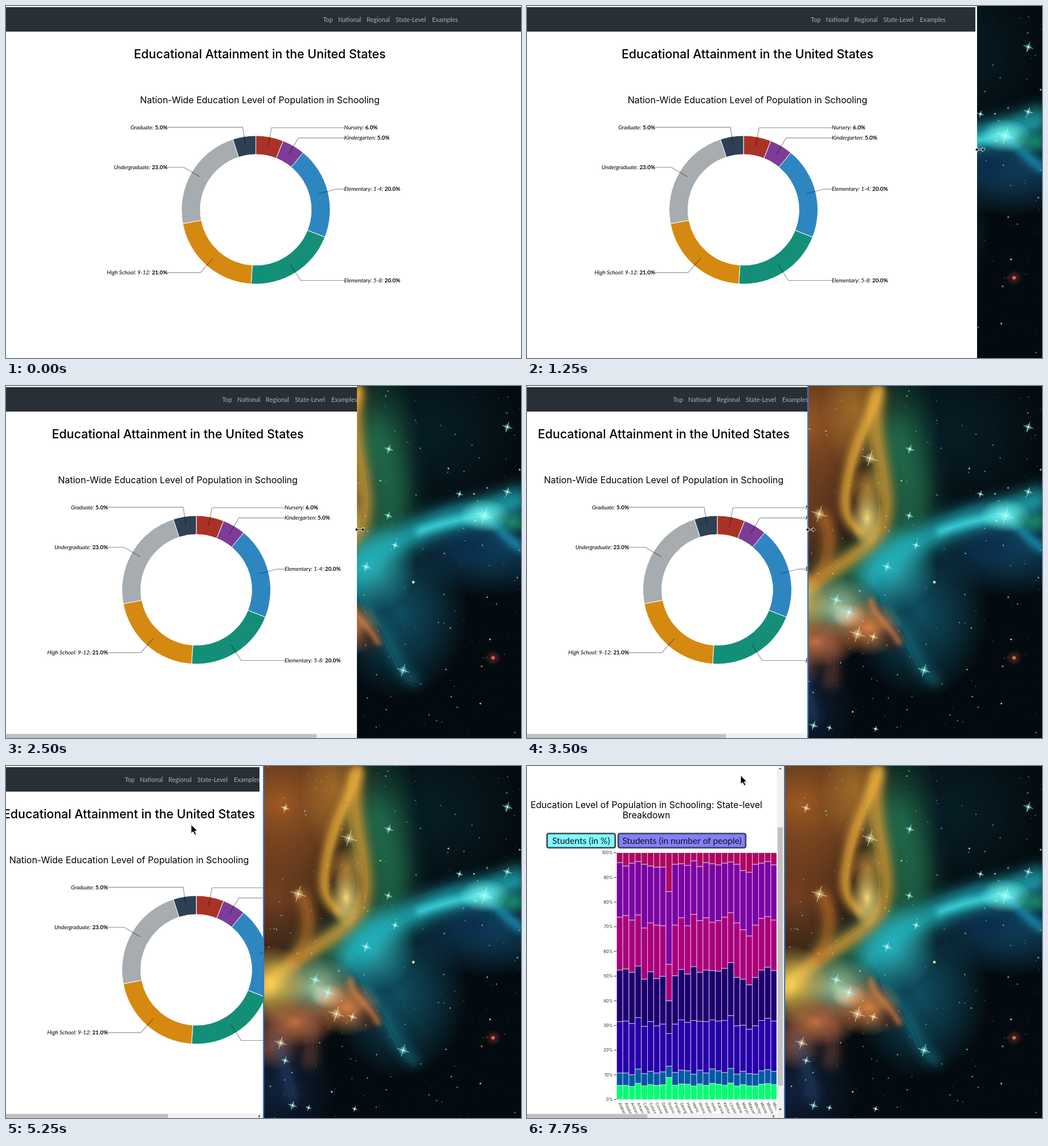
An HTML page with a canvas for the animation above (8 s loop, 904 px wide and 619 px high).

```html
<!DOCTYPE html>
<html lang="en">
<head>
<meta charset="utf-8">
<title>Educational Attainment</title>
<style>
  html, body { margin: 0; width: 100%; height: 100%; overflow: hidden; background: #fff; }
  canvas, #stage { position: absolute; left: 0; top: 0; display: block; }
  text { font-family: Lato, sans-serif; }
  .head { font-family: Inter, sans-serif; }
</style>
</head>
<body>
<canvas id="sky" width="904" height="619"></canvas>
<svg id="stage" width="904" height="619" viewBox="0 0 904 619"></svg>
<script>
const W = 904, H = 619, STEP = 250, LOOP = 8000;

// ---------- helpers ----------
function el(parent, tag, attrs = {}, text) {
  const node = document.createElementNS('http://www.w3.org/2000/svg', tag);
  for (const k in attrs) node.setAttribute(k, attrs[k]);
  if (text !== undefined) node.textContent = text;
  return parent.appendChild(node);
}
const set = (node, attrs) => { for (const k in attrs) node.setAttribute(k, attrs[k]); };
const show = (node, on) => node.setAttribute('display', on ? 'inline' : 'none');
const move = (node, x, y = 0) => node.setAttribute('transform', `translate(${x} ${y})`);
const group = parent => el(parent, 'g');
const rect = (parent, x, y, width, height, fill, more) =>
  el(parent, 'rect', { x, y, width, height, fill, ...more });
const label = (parent, x, y, size, text, more) =>
  el(parent, 'text', { x, y, 'font-size': size, ...more }, text);
const heading = (parent, x, y, size, text, more) =>
  label(parent, x, y, size, text, { class: 'head', 'text-anchor': 'middle', ...more });

function seeded(seed) {
  return () => (seed = (seed * 16807) % 2147483647) / 2147483647;
}

// ---------- night sky ----------
function paintSky(ctx) {
  const rnd = seeded(77);
  ctx.fillStyle = '#040b10';
  ctx.fillRect(0, 0, W, H);

  const blob = (x, y, rx, ry, color, alpha) => {
    const g = ctx.createRadialGradient(0, 0, 0, 0, 0, 1);
    g.addColorStop(0, color);
    g.addColorStop(0.5, color + '90');
    g.addColorStop(1, color + '00');
    ctx.save();
    ctx.globalAlpha = alpha;
    ctx.translate(x, y);
    ctx.scale(rx, ry);
    ctx.fillStyle = g;
    ctx.fillRect(-1, -1, 2, 2);
    ctx.restore();
  };
  const ribbon = (d, width, blur, color, alpha, strands = 0) => {
    const path = new Path2D(d);
    ctx.save();
    ctx.strokeStyle = color;
    ctx.globalAlpha = alpha;
    ctx.lineWidth = width;
    ctx.filter = `blur(${blur}px)`;
    ctx.stroke(path);
    ctx.filter = 'none';
    ctx.lineWidth = 0.8;
    ctx.globalAlpha = 0.16;
    for (let i = 0; i < strands; i++) {
      ctx.save();
      ctx.translate((rnd() - 0.5) * width, (rnd() - 0.5) * width);
      ctx.stroke(path);
      ctx.restore();
    }
    ctx.restore();
  };

  blob(740, 80, 170, 150, '#07222a', 0.8);
  blob(850, 280, 150, 90, '#11496a', 0.9);
  blob(690, 400, 120, 150, '#11596f', 0.85);
  blob(470, 570, 110, 110, '#14294a', 0.7);
  blob(480, 70, 190, 190, '#a05a24', 1);
  blob(470, 230, 140, 170, '#7c4420', 0.9);
  blob(575, 40, 60, 110, '#c08030', 0.7);
  blob(655, 110, 70, 180, '#1c5a3c', 0.8);
  ribbon('M640 60 C650 130 690 180 670 235 S600 310 520 360', 70, 22, '#23704f', 0.8, 14);
  blob(640, 320, 80, 80, '#2fb0b8', 0.9);
  ribbon('M616 5 C600 80 630 150 630 205 S610 275 560 308 S490 355 440 400', 24, 9, '#d99a36', 0.85, 16);
  ribbon('M618 0 C612 40 578 90 566 150 S552 230 590 262', 16, 7, '#f0b23c', 0.85, 14);
  ribbon('M515 220 C540 260 535 310 500 350', 20, 9, '#c8792c', 0.7, 8);
  blob(597, 232, 28, 55, '#ffe07a', 0.95);
  blob(598, 180, 30, 40, '#e0a040', 0.7);
  ribbon('M604 352 C625 300 680 275 735 250 S850 225 914 192', 40, 14, '#22b4c0', 0.85, 20);
  ribbon('M720 258 C770 238 800 236 840 226', 12, 6, '#4ff0f2', 0.7, 6);
  ribbon('M840 225 C860 245 880 270 908 288', 16, 7, '#1f9fc4', 0.75, 8);
  ribbon('M622 335 C618 380 650 410 672 450 S695 510 725 520', 18, 10, '#1b8496', 0.55, 12);
  blob(840, 228, 45, 30, '#7dfff4', 0.85);
  blob(890, 240, 40, 22, '#20a878', 0.7);
  blob(815, 282, 65, 35, '#0a2b4c', 0.8);
  blob(545, 390, 75, 55, '#a9d0a4', 0.95);
  blob(465, 385, 65, 70, '#ffd658', 0.95);
  blob(565, 405, 30, 22, '#f2f4df', 0.8);
  blob(600, 425, 60, 50, '#df8342', 0.95);
  blob(510, 450, 75, 45, '#e0824a', 0.9);
  blob(470, 490, 50, 45, '#b46650', 0.7);
  blob(640, 445, 28, 30, '#3a211c', 0.8);
  ribbon('M605 372 C600 400 640 420 655 455', 9, 5, '#e08848', 0.7, 8);
  ribbon('M520 440 C535 470 540 490 530 530', 26, 10, '#8a5040', 0.5, 10);
  ribbon('M475 480 C490 510 490 550 505 590', 18, 9, '#355080', 0.5, 8);

  for (let i = 0; i < 620; i++) {
    ctx.globalAlpha = 0.2 + rnd() * 0.65;
    ctx.fillStyle = ['#d8fff2', '#8fe6e0', '#ffe9c0', '#6fb8c8'][i % 4];
    ctx.beginPath();
    ctx.arc(440 + rnd() * 464, rnd() * H, 0.35 + rnd() ** 4 * 1.3, 0, 7);
    ctx.fill();
  }
  ctx.globalAlpha = 1;

  const disc = (x, y, r, color) => {
    ctx.fillStyle = color;
    ctx.beginPath();
    ctx.arc(x, y, r, 0, 7);
    ctx.fill();
  };
  blob(855, 478, 14, 14, '#a03c30', 0.5);
  disc(855, 478, 3, '#e2694e');
  disc(835, 493, 1.7, '#c8563f');
  disc(715, 345, 2.4, '#f0dfa0');

  const sparkle = (x, y, r, color) => {
    blob(x, y, r * 0.7, r * 0.7, color, 0.7);
    ctx.strokeStyle = color;
    ctx.lineWidth = 0.9;
    ctx.beginPath();
    for (const a of [0.3, 1.87]) {
      const dx = r * Math.cos(a), dy = r * Math.sin(a);
      ctx.moveTo(x - dx, y - dy);
      ctx.lineTo(x + dx, y + dy);
    }
    ctx.stroke();
    disc(x, y, 1.4, '#fff');
  };
  [[602, 127, 14], [513, 225, 14], [490, 74, 8], [482, 487, 11], [608, 441, 8], [580, 436, 14]]
    .forEach(s => sparkle(...s, '#ffedb0'));
  [[543, 376, 10], [565, 398, 11], [840, 228, 15], [880, 72, 9], [672, 111, 8], [880, 186, 8],
   [697, 500, 11], [503, 597, 8], [632, 318, 9], [612, 603, 5], [671, 228, 7], [490, 518, 7],
   [683, 280, 7], [796, 190, 6], [531, 601, 5]]
    .forEach(s => sparkle(...s, '#a8fff6'));
}

// ---------- page parts ----------
function buildNav(parent) {
  const bar = rect(parent, 0, 2, W, 43, '#282f37');
  const links = group(parent);
  [['Top', 556.5], ['National', 583], ['Regional', 633], ['State-Level', 684], ['Examples', 748]]
    .forEach(([name, x]) => label(links, x - 793, 27.6, 10.9, name, { fill: '#aeb1b4' }));
  return { bar, links };
}

function buildDonut(parent) {
  const at = (f, r) => [r * Math.sin(2 * Math.PI * f), -r * Math.cos(2 * Math.PI * f)];
  const slices = [
    ['Nursery', 6, '#a93226'], ['Kindergarten', 5, '#7d3c98'], ['Elementary: 1-4', 20, '#2e86c1'],
    ['Elementary: 5-8', 20, '#148f77'], ['High School: 9-12', 21, '#d68910'],
    ['Undergraduate', 23, '#a6acaf'], ['Graduate', 5, '#2e4053']];
  const ring = group(parent), notes = group(parent);
  let sum = 0;
  for (const [name, pct, fill] of slices) {
    const a = sum / 100, b = (sum += pct) / 100, mid = (a + b) / 2;
    el(ring, 'path', {
      d: `M${at(a, 130.5)}A130.5 130.5 0 0 1 ${at(b, 130.5)}L${at(b, 97.5)}A97.5 97.5 0 0 0 ${at(a, 97.5)}Z`,
      fill, stroke: '#fff', 'stroke-width': 1
    });
    const right = mid < 0.5, elbow = at(mid, 147), end = right ? 155 : -155;
    el(notes, 'polyline', {
      points: `${at(mid, 114)} ${elbow} ${end},${elbow[1]}`,
      fill: 'none', stroke: '#000', 'stroke-width': 1.4, opacity: 0.36
    });
    const t = label(notes, end, elbow[1] + 3.3, 9.9, '', { 'text-anchor': right ? 'start' : 'end' });
    el(t, 'tspan', { 'font-style': 'italic' }, name + ': ');
    el(t, 'tspan', { 'font-weight': 700 }, pct.toFixed(1) + '%');
  }
}

function button(parent, x, y, width, text, on) {
  const box = { x: x + 1.2, y: y + 1.2, width: width - 2.4, height: 25, rx: 3 };
  el(parent, 'rect', { ...box, fill: on ? '#80fcff' : '#8280fb', stroke: '#26283c', 'stroke-width': 2.6 });
  el(parent, 'rect', { ...box, fill: 'none', stroke: '#7d8794', 'stroke-width': 0.6 });
  label(parent, x + width / 2, y + 19, 15.6, text, { 'text-anchor': 'middle', fill: '#10101c' });
}

function buildRegions(parent) {
  heading(parent, 209.5, 220.5, 16, 'Educational Attainment: Region-level Breakdown of');
  heading(parent, 209.5, 239, 16, 'University Students');
  button(parent, 52, 265, 314, 'Pursuing a Masters degree (in # of students)', true);
  button(parent, 88, 293, 242, 'Pursuing a Masters degree (in %)');
  button(parent, 88, 321.5, 242, 'Males in College (18-24yrs)(in %)');
  button(parent, 79, 349.5, 261, 'Females in College (18-24yrs) (in %)');

  rect(parent, 24, 393, 372.5, 19.5, '#f8ae72');
  label(parent, 29, 407, 9.4, 'United States of America - Click a Region to Inspect States',
    { class: 'head', fill: '#fff', 'font-weight': 600 });

  const green = '#577a57', olive = '#6a6b57';
  const cells = [
    [24, 415, 96, 457, green], [24, 458, 96, 470, green], [24, 471, 96, 563, olive],
    [97, 415, 148, 433, green], [97, 434, 148, 563, olive],
    [149, 415, 331.5, 509, '#835f59'], [149, 510, 331.5, 563, '#776456'],
    [332.5, 415, 342, 513, green], [332.5, 514, 342, 563, green],
    [344, 415, 390, 489, green], [391, 415, 396.5, 489, green],
    [344, 490, 396.5, 591, olive], [344, 592, 396.5, 619, '#5f7558'],
    [24, 566, 114, 619, '#746459'], [115, 566, 193, 597, green], [115, 598, 193, 619, green],
    [194, 566, 253, 619, '#617257'], [254, 566, 320, 619, '#607258'], [321, 566, 342, 619, green]];
  for (const [x, y, x2, y2, fill] of cells) rect(parent, x, y, x2 - x, y2 - y, fill);

  [['Northeast', '4,189,673', 427.3], ['Midwest', '4,861,083', 578.3]].forEach(([name, count, y]) => {
    heading(parent, 183, y, 12, name, { 'font-weight': 500 });
    label(parent, 183, y + 11.5, 9.2, count, { 'text-anchor': 'middle' });
  });
}

// Upper edges of four bands per state; the other two follow from them.
const STATES = {
  Alabama: [170, 266, 359, 540], Alaska: [176, 263, 357, 540], Arizona: [171, 271, 363, 543],
  Arkansas: [168, 262, 352, 533], California: [173, 285, 375, 541], Colorado: [176, 276, 362, 537],
  Connecticut: [178, 280, 374, 540], Delaware: [178, 281, 370, 538],
  'District of Columbia': [221, 349, 413, 528], Florida: [173, 280, 369, 539],
  Georgia: [172, 267, 358, 535], Hawaii: [175, 281, 366, 536], Idaho: [167, 261, 353, 542],
  Illinois: [177, 272, 363, 535], Indiana: [170, 267, 359, 540], Iowa: [172, 275, 360, 533],
  Kansas: [174, 272, 361, 536], Kentucky: [171, 266, 356, 539], Louisiana: [169, 258, 346, 532],
  Maine: [173, 276, 372, 542], Maryland: [184, 288, 375, 537], Massachusetts: [187, 299, 385, 541],
  Michigan: [173, 280, 372, 542], Minnesota: [171, 268, 359, 536],
  Mississippi: [168, 265, 354, 534], Missouri: [174, 271, 360, 537]
};
const SCROLL = 147;

function buildStates(page) {
  const parent = group(page);
  move(parent, 0, SCROLL);
  heading(parent, 209.5, 73.5, 15.8, 'Education Level of Population in Schooling: State-level');
  heading(parent, 209.5, 91.5, 15.8, 'Breakdown');
  button(parent, 34, 117.5, 122, 'Students (in %)', true);
  button(parent, 159, 117.5, 226, 'Students (in number of people)');

  const top = 152.5, base = 586.5, pitch = 10.83;
  const fills = ['#ae0660', '#7c03a3', '#aa007a', '#1d0070', '#2600a8', '#0059a4', '#00ff72'];
  Object.entries(STATES).forEach(([name, [a, b, c, e]], i) => {
    const x = 157.3 + i * pitch;
    const green = base - (base - e) * (e < 530 ? 0.66 : 0.53);
    const ys = [top, a, b, c, (c + e) / 2, e, green, base];
    fills.forEach((fill, k) => rect(parent, x, ys[k], pitch, ys[k + 1] - ys[k], fill,
      { stroke: '#e9dff0', 'stroke-width': 0.8 }));
    label(parent, 0, 0, 7, name,
      { class: 'head', fill: '#333', transform: `translate(${x + 3} 593) rotate(65)` });
  });
  for (let p = 0; p <= 100; p += 10) {
    const y = base - (base - top) * p / 100;
    rect(parent, 152.5, y - 0.5, 4.5, 1, '#333');
    label(parent, 150.5, y + 2.6, 7.2, p + '%', { class: 'head', 'text-anchor': 'end', fill: '#222' });
  }
}

function buildPointers(parent) {
  const shape = (d, fill, stroke) => {
    const g = group(parent);
    el(g, 'path', { d, fill, stroke, 'stroke-width': 0.9, 'stroke-linejoin': 'round' });
    return g;
  };
  return {
    resize: shape('M-8.5 0L-4 -4V-1H4V-4L8.5 0L4 4V1H-4V4Z', '#000', '#fff'),
    arrow: shape('M0 0V15.5L3.6 12.2L6.2 18L8.8 16.9L6.3 11.2H11Z', '#000', '#fff'),
    hand: shape('M-3 -8a1.3 1.3 0 0 1 2.6 0v5l4.2 1q1.7 .5 1.5 2.4l-.8 5q-.3 1.8 -2 1.8h-3.6' +
      'q-1.2 0 -2 -1.2l-2.8 -4.4q-.5 -1.7 1 -1.4l1.9 1.4z', '#fff', '#111')
  };
}

// ---------- assembly ----------
paintSky(document.getElementById('sky').getContext('2d'));
const stage = document.getElementById('stage');
const view = el(stage, 'svg', { x: 0, y: 0, width: W, height: H, overflow: 'hidden' });
rect(view, 0, 0, W, H, '#fff');

const doc = group(view);
const nav = buildNav(doc);
const bold = { 'font-weight': 500 };
const home = group(doc), titles = group(home), donut = group(home);
heading(titles, 0, 91.5, 21.4, 'Educational Attainment in the United States', bold);
heading(titles, 0, 170.5, 16, 'Nation-Wide Education Level of Population in Schooling');
buildDonut(donut);

const narrow = group(doc);
heading(narrow, 209.5, 91.5, 21.4, 'Educational Attainment in the United', bold);
heading(narrow, 209.5, 116.5, 21.4, 'States', bold);
const regions = group(doc), states = group(doc);
buildRegions(regions);
buildStates(states);

const hbar = group(view);
rect(hbar, 0, 611, W, 8, '#f1f1f1');
const hthumb = rect(hbar, 0, 612, 0, 7, '#c1c1c1');
const harrow = el(hbar, 'path', { d: 'M-1.5 613.5L1.5 616L-1.5 618.5Z', fill: '#444' });

const vbar = group(view);
rect(vbar, 438, 0, 14, H, '#fff');
rect(vbar, 439, 0, 11, H, '#f1f1f1');
const vthumb = rect(vbar, 440, 9, 9, 466, '#c1c1c1');
el(vbar, 'path', { d: 'M442 6L444.5 3L447 6Z', fill: '#555' });
const vdown = el(vbar, 'path', { d: 'M442 -1.5L444.5 1.5L447 -1.5Z', fill: '#444' });

const status = group(view);
el(status, 'path', { d: 'M0 607H132q3 0 3 3V619H0Z', fill: '#2a2e31' });
label(status, -1, 616.8, 8.3, 'hub.io/.../D3js-US-educational-at...', { fill: '#b5dca0' });

const border = rect(stage, 0, 0, 2.2, H, '#4474bd');
const pointers = buildPointers(stage);

// ---------- timeline ----------
const WIDTHS = [[1, 904], [5, 787], [6, 760], [10, 616], [11, 590], [14, 493], [18, 445]];

function lerpKeys(keys, n) {
  if (n <= keys[0][0]) return keys[0][1];
  for (let i = 1; i < keys.length; i++) {
    const [a, u] = keys[i - 1], [b, v] = keys[i];
    if (n <= b) return u + (v - u) * (n - a) / (b - a);
  }
  return keys[keys.length - 1][1];
}

function pointerAt(n, edge) {
  if (n < 2) return [];
  if (n < 18) return ['resize', edge + 5, 252.5];
  if (n < 22) {
    const k = (n - 18) / 3;
    return ['arrow', 440 - 115 * k, 240 - 137 * k];
  }
  if (n < 24) return ['hand', 303, 36];
  if (n < 26) return ['hand', 308, 36];
  if (n < 27) return ['hand', 332, 33];
  if (n < 30) return ['hand', 348, 36];
  return n < 31 ? ['arrow', 362, 26] : ['arrow', 375, 16.5];
}

function render(ms) {
  const n = Math.floor(ms % LOOP / STEP);
  const page = n < 23 ? 'home' : n < 29 ? 'regions' : 'states';
  const isHome = page === 'home', isStates = page === 'states';
  const w = isHome ? Math.round(lerpKeys(WIDTHS, n)) : 432;
  const settled = n >= 18;
  const edge = settled ? 452 : w < 700 || w === W ? w : w + 3;
  const scroll = n === 31 ? SCROLL : n === 30 ? SCROLL / 2 : 0;

  view.setAttribute('width', edge);
  move(doc, 0, -scroll);
  nav.bar.setAttribute('width', w);
  move(nav.links, Math.min(w, 341 + w / 2));
  show(home, isHome);
  show(narrow, !isHome);
  show(regions, page === 'regions');
  show(states, isStates);
  move(titles, (w - 13) / 2);
  move(donut, Math.max(334, 438.5 - (W - w) / 2), 358.5);

  show(hbar, isStates || isHome && w < 696);
  hthumb.setAttribute('width', isStates ? 211 : w * w / 696);
  show(harrow, settled);
  move(harrow, isStates ? 433 : 445);
  show(vbar, !isHome);
  set(vthumb, { y: 9 + scroll * 0.673, height: isStates ? 454 : 466 });
  move(vdown, 0, isStates ? 604 : 616);
  show(status, n >= 22 && n < 30);
  show(border, n >= 14);
  border.setAttribute('x', edge - 1);

  const [kind, x, y] = pointerAt(n, edge);
  for (const k in pointers) show(pointers[k], k === kind);
  if (kind) move(pointers[kind], x, y);
}

const start = performance.now();
function tick() {
  render(performance.now() - start);
  requestAnimationFrame(tick);
}
tick();
</script>
</body>
</html>
```
